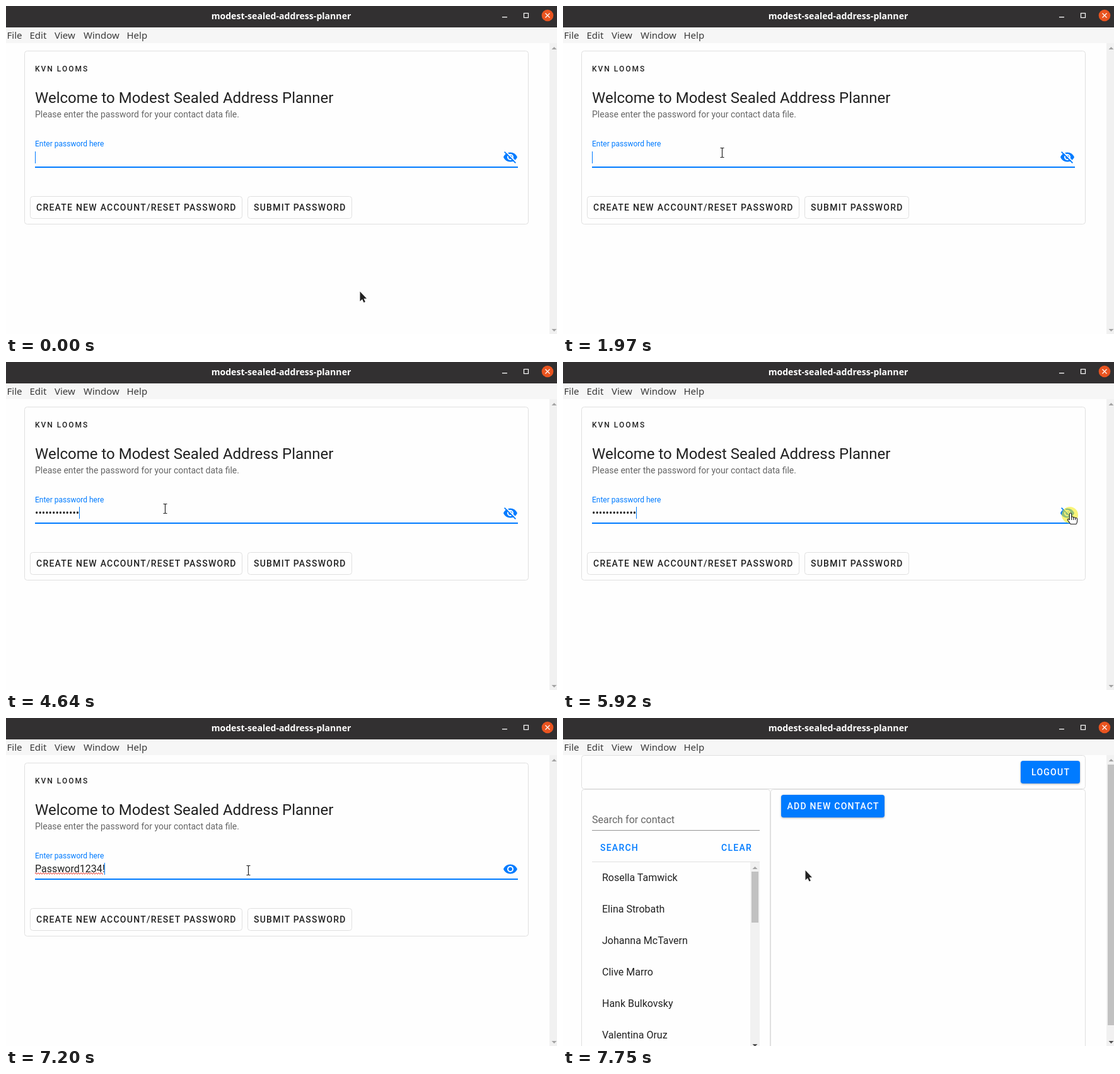
These frames come from a looping animation (874 by 521 pixels, 8000 ms). An HTML page:

```html
<!DOCTYPE html>
<html lang="en">
<head>
<meta charset="utf-8">
<title>Contact manager login</title>
<style>
  html, body { margin: 0; width: 100%; height: 100%; overflow: hidden; background: #fefefe; }
  svg { display: block; width: 100%; height: 100%; }
  text { font: 400 16px Roboto, sans-serif; fill: #212121; white-space: pre; }
  .title { font: 700 14.1px "Noto Sans", sans-serif; fill: #fff; text-anchor: middle; }
  .menu { font: 400 15px "Noto Sans", sans-serif; fill: #3a3a3a; }
  .over { font-size: 12px; font-weight: 500; letter-spacing: 2px; }
  .head { font-size: 24px; }
  .sub { font-size: 14px; fill: #666; }
  .label { font-size: 12px; fill: #007bff; }
  .hint { fill: #666; }
  .btn { font-size: 14px; font-weight: 500; letter-spacing: 1.25px; }
  .blue { fill: #007bff; }
  .white { fill: #fff; }
  .box { fill: #fefefe; stroke: #e0e0e0; }
  .raised { fill: #007bff; filter: drop-shadow(0 1.5px 1.5px rgba(0, 0, 0, .3)); }
  .track { fill: #f1f1f1; }
  .thumb { fill: #c1c1c1; }
</style>
</head>
<body>
<svg id="stage" viewBox="0 0 874 521" preserveAspectRatio="none">
  <rect width="874" height="521" fill="#fefefe"/>

  <g id="login">
    <rect class="box" x="29.5" y="71.5" width="799" height="275" rx="4"/>
    <text class="over" x="46" y="104">KVN LOOMS</text>
    <text class="head" x="46" y="154">Welcome to Modest Sealed Address Planner</text>
    <text class="sub" x="46" y="177">Please enter the password for your contact data file.</text>
    <text class="label" x="46" y="223">Enter password here</text>
    <text id="entry" x="46" y="245"></text>
    <path id="squiggle" fill="none" stroke="#e8362c" stroke-width="1"/>
    <rect id="caret" class="blue" width="1" height="19"/>
    <rect class="blue" x="46" y="255" width="766" height="2"/>
    <g transform="translate(788 228)">
      <path class="blue" fill-rule="evenodd" d="M12 4.5C7 4.5 2.73 7.61 1 12C2.73 16.39 7 19.5 12 19.5S21.27 16.39 23 12C21.27 7.61 17 4.5 12 4.5ZM12 7A5 5 0 0 1 12 17A5 5 0 0 1 12 7ZM12 9A3 3 0 0 0 12 15A3 3 0 0 0 12 9Z"/>
      <g id="slash" stroke-width="1.8">
        <path stroke="#fefefe" d="M2 .465l20 20"/>
        <path stroke="#007bff" d="M2.635 3.635l17.73 17.73"/>
      </g>
    </g>
    <rect class="box" x="38.5" y="302.5" width="336" height="35" rx="4"/>
    <text class="btn" x="48" y="325">CREATE NEW ACCOUNT/RESET PASSWORD</text>
    <rect class="box" x="383.5" y="302.5" width="165" height="35" rx="4"/>
    <text class="btn" x="393" y="325">SUBMIT PASSWORD</text>
  </g>

  <g id="contacts">
    <rect class="box" x="29.5" y="59.5" width="799" height="53" rx="4"/>
    <rect class="box" x="29.5" y="113.5" width="299" height="420" rx="4"/>
    <rect class="box" x="329.5" y="113.5" width="499" height="420" rx="4"/>
    <rect class="raised" x="726" y="68" width="94" height="36" rx="4"/>
    <text class="btn white" x="743" y="91">LOGOUT</text>
    <rect class="raised" x="346" y="122" width="164" height="36" rx="4"/>
    <text class="btn white" x="355.5" y="145">ADD NEW CONTACT</text>
    <text class="hint" x="46" y="167">Search for contact</text>
    <rect x="46" y="178" width="266" height="1" fill="#949494"/>
    <text class="btn blue" x="59" y="211">SEARCH</text>
    <text class="btn blue" x="251" y="211">CLEAR</text>
    <rect x="46" y="228" width="266" height="1" fill="#e0e0e0"/>
    <g id="names"></g>
    <rect class="track" x="297" y="229" width="15" height="292"/>
    <rect class="thumb" x="299" y="244" width="11" height="81"/>
    <path fill="#a3a3a3" d="M300.5 240l4-4 4 4z"/>
    <path fill="#505050" d="M300.5 518l4 4 4-4z"/>
  </g>

  <rect class="track" x="862" y="59" width="12" height="462"/>
  <rect id="pageThumb" class="thumb" x="864" y="74" width="11" height="414"/>
  <path fill="#a3a3a3" d="M865.5 69l4-4 4 4z"/>
  <path id="pageDown" d="M865.5 513l4 4 4-4z"/>

  <rect width="874" height="34" fill="#323031"/>
  <text class="title" x="436.5" y="21">modest-sealed-address-planner</text>
  <rect x="787" y="17" width="8" height="1.3" fill="#fff"/>
  <rect x="821.5" y="11.5" width="7" height="7" fill="none" stroke="#fff" stroke-width="1.2"/>
  <circle cx="859" cy="15" r="9.3" fill="#e95420"/>
  <path d="M855.5 11.5l7 7m0-7l-7 7" stroke="#fff" stroke-width="1.3"/>
  <rect y="34" width="874" height="25" fill="#f6f6f6"/>
  <g id="menu"></g>

  <circle id="click" cx="804" cy="243" r="13" fill="#f5ec1e" fill-opacity=".6"/>
  <g id="pointer">
    <path id="arrow" d="M0 0V15.5L3.6 12.2 6 17.6 8.4 16.6 6 11.2H10.6Z" fill="#222" stroke="#fff" stroke-width="1.6" paint-order="stroke"/>
    <g id="beam" fill="none">
      <path d="M-3 -7.5h2.2l.8 .8 .8 -.8H3M-3 7.5h2.2l.8 -.8 .8 .8H3M0 -7V7" stroke="#fff" stroke-width="2.6"/>
      <path d="M-3 -7.5h2.2l.8 .8 .8 -.8H3M-3 7.5h2.2l.8 -.8 .8 .8H3M0 -7V7" stroke="#222" stroke-width="1.2"/>
    </g>
    <path id="hand" d="M-1.6 11V1.6Q-1.6 0 0 0T1.6 1.6V6.5Q2 5.6 3.2 5.8T4.6 7.3Q5 6.4 6.2 6.7T7.6 8Q8 7.4 9.2 7.6T10.6 9.2V13Q10.5 15.5 9 17.5H0Q-1.5 15 -4.6 11.2Q-5 9.3 -3.3 9.2Q-2.3 9.6 -1.6 11ZM4.6 7.3V11M7.6 8V11M1.6 6.5V11" fill="#fff" stroke="#222" stroke-width="1.1"/>
  </g>
</svg>
<script>
  const LOOP = 8000, TICK = 1000 / 15;
  const REVEAL = 5990, OPEN = 7680, SETTLED = 7750;
  const PASSWORD = "Password1234!";
  const DOT = 5.39;
  const keyTimes = [2100, 2300, 2500, 2760, 3020, 3220, 3290, 3490, 3820, 4020, 4220, 4370, 4640];
  // The caret starts visible and flips at each of these times.
  const blinks = [140, 740, 1360, 1970, 5240, 5840, 6600, 7200];
  // Pointer hot spot: time, x, y
  const path = [
    [70, 561.5, 453.5], [200, 600, 464], [330, 624, 455], [470, 600, 420],
    [600, 540, 375], [730, 488.5, 338.5], [760, 488.5, 338.5], [810, 470, 318],
    [880, 438, 288], [1000, 375, 250], [1140, 310, 230], [1340, 252.5, 233],
    [5120, 252.5, 233], [5280, 310, 240], [5420, 490, 262], [5560, 690, 285],
    [5680, 834, 272], [5780, 826, 226], [5870, 805, 240],
    [5960, 805, 240], [6140, 812, 238],
    [6350, 812, 238], [6490, 740, 212], [6620, 600, 208], [6760, 470, 222],
    [6880, 405, 238], [6990, 384.5, 242]
  ];

  const $ = id => document.getElementById(id);
  const show = (id, on) => $(id).setAttribute("display", on ? "inline" : "none");
  const countUntil = (times, t) => times.filter(v => v <= t).length;

  function addText(parent, x, y, label, cls) {
    const el = document.createElementNS("http://www.w3.org/2000/svg", "text");
    el.setAttribute("x", x);
    el.setAttribute("y", y);
    if (cls) el.setAttribute("class", cls);
    el.textContent = label;
    $(parent).append(el);
  }

  [["File", 1.5], ["Edit", 37.5], ["View", 77], ["Window", 123], ["Help", 191.5]]
    .forEach(([label, x]) => addText("menu", x, 52, label, "menu"));
  ["Rosella Tamwick", "Elina Strobath", "Johanna McTavern", "Clive Marro", "Hank Bulkovsky", "Valentina Oruz"]
    .forEach((name, i) => addText("names", 62, 259 + 50 * i, name));
  $("squiggle").setAttribute("d", "M46 247" + "q1 -2.4 2 0t2 0".repeat(27));

  function pointerAt(t) {
    const s = Math.floor(t / TICK) * TICK + 7;
    const i = path.findIndex(p => p[0] > s);
    if (i === 0) return path[0].slice(1);
    if (i < 0) return path[path.length - 1].slice(1);
    const [t0, x0, y0] = path[i - 1], [t1, x1, y1] = path[i];
    const k = (s - t0) / (t1 - t0);
    return [x0 + (x1 - x0) * k, y0 + (y1 - y0) * k];
  }

  function shapeAt(x, y, t) {
    const within = (l, r, top, b) => x >= l && x <= r && y >= top && y < b;
    if (t >= SETTLED) return "arrow";
    if (within(38, 375, 302, 338) || within(383, 549, 302, 338) || within(787, 813, 228, 252)) return "hand";
    return within(46, 787, 208, 258) ? "beam" : "arrow";
  }

  function draw(t) {
    const typed = countUntil(keyTimes, t);
    const plain = t >= REVEAL, open = t >= OPEN;
    show("login", !open);
    show("contacts", open);
    show("pageThumb", open);
    $("pageDown").setAttribute("fill", open ? "#505050" : "#a3a3a3");

    $("entry").textContent = plain ? PASSWORD : "•".repeat(typed);
    show("squiggle", plain);
    show("slash", !plain);
    $("caret").setAttribute("x", plain ? 156 : Math.floor(46 + DOT * typed));
    $("caret").setAttribute("y", typed ? 230 : 231);
    show("caret", countUntil(blinks, t) % 2 === 0);

    show("click", t >= 5920 && t < REVEAL);
    const [x, y] = pointerAt(t), shape = shapeAt(x, y, t);
    for (const id of ["arrow", "beam", "hand"]) show(id, id === shape);
    $("pointer").setAttribute("transform", `translate(${x} ${y})`);
  }

  const start = performance.now();
  function frame() {
    draw((performance.now() - start) % LOOP);
    requestAnimationFrame(frame);
  }
  frame();
</script>
</body>
</html>
```
